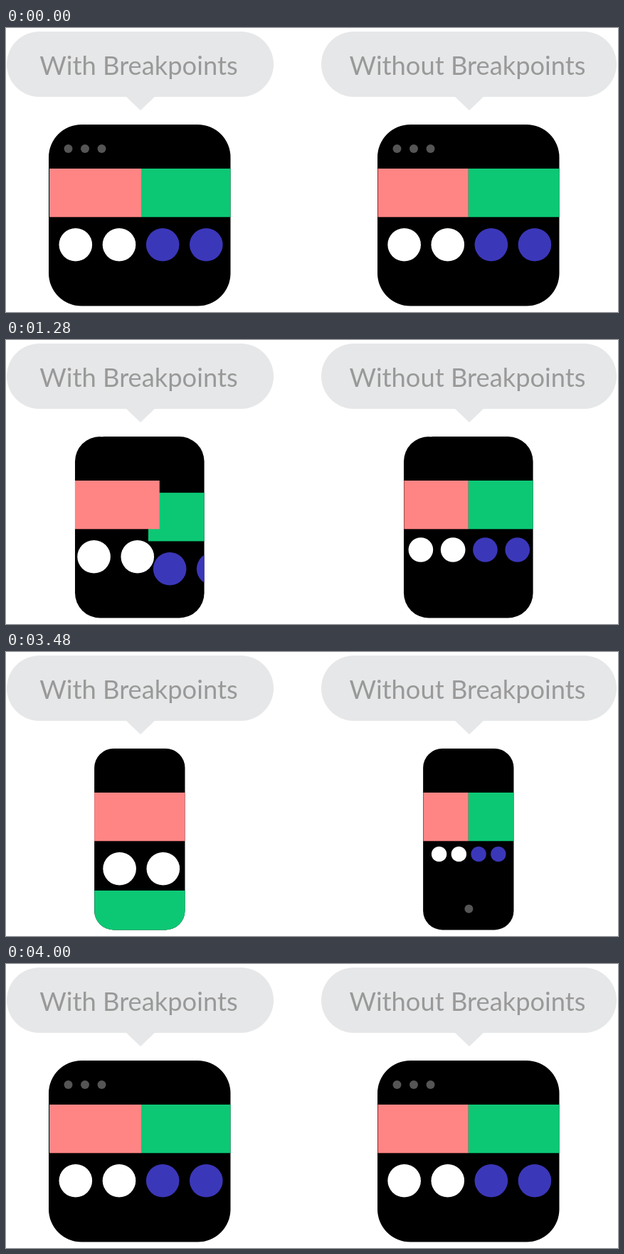
An HTML page that plays this animation: 860x400 px, repeating every 5.04 s.

```html
<!DOCTYPE html>
<html lang="en">
<head>
<meta charset="utf-8">
<title>Breakpoints</title>
<style>
  html, body { margin: 0; width: 100%; height: 100%; overflow: hidden; background: #fff; }
  svg { display: block; width: 860px; height: 400px; }
  text { font: 36.3px Lato, "Open Sans", sans-serif; fill: #999; text-anchor: middle; }
  .bubble { fill: #e6e7e8; }
  .pink { fill: #ff8585; }
  .green { fill: #0cc874; }
  .white { fill: #fff; }
  .blue { fill: #3b37b9; }
  .grey { fill: #555; }
</style>
</head>
<body>
<svg id="stage" viewBox="0 0 860 400"></svg>
<script>
const LOOP = 5040, STEP = 40;
const stage = document.getElementById('stage');

function add(parent, tag, attrs) {
  const el = document.createElementNS('http://www.w3.org/2000/svg', tag);
  parent.appendChild(el);
  return set(el, attrs || {});
}
function set(el, attrs) {
  for (const key in attrs) el.setAttribute(key, attrs[key]);
  return el;
}
const circle = (parent, cls, cx, cy, r) => add(parent, 'circle', { class: cls, cx, cy, r });
const band = (parent, cls, x, width) => add(parent, 'rect', { class: cls, x, y: 198, width, height: 68.3 });
const move = (el, x, y) => set(el, { transform: `translate(${x} ${y})` });
const mix = (a, b, p) => a + (b - a) * p;

// Sine ease in and out; skew shifts the fast part earlier (<1) or later (>1)
function ease(t, start, end, skew = 1) {
  const u = Math.min(1, Math.max(0, (t - start) / (end - start)));
  return (1 - Math.cos(Math.PI * u ** skew)) / 2;
}

function bubble(x, width, tip, label) {
  add(stage, 'rect', { class: 'bubble', x, y: 5, width, height: 92, rx: 46 });
  add(stage, 'path', { class: 'bubble', d: `M${tip - 21} 96h42l-21 20z` });
  add(stage, 'text', { x: x + width / 2 - 2, y: 66 }).textContent = label;
}

const defs = add(stage, 'defs');

function device(id, left) {
  const clip = add(add(defs, 'clipPath', { id }), 'rect', { y: 136, height: 255.4 });
  const body = add(stage, 'g', { 'clip-path': `url(#${id})` });
  add(body, 'rect', { x: left, y: 136, width: 256, height: 256 });
  const dots = add(body, 'g');
  for (let i = 0; i < 3; i++) circle(dots, 'grey', left + 27.5 + 23.5 * i, 170, 6);
  const home = circle(body, 'grey', left + 128.4, 361.5, 6);

  return {
    body,
    resize(p) {
      set(clip, { x: left + 64.3 * p, width: mix(255.5, 127, p), rx: mix(46, 27, p) });
      move(dots, 0, -68 * p);
      move(home, 0, 90 * (1 - p));
    }
  };
}

bubble(1, 375, 189, 'With Breakpoints');
bubble(443, 415, 651, 'Without Breakpoints');

// Left: blocks keep their size and wrap
const wrapped = device('wrapped', 60);
const row = add(wrapped.body, 'g');
const second = add(row, 'g');
band(second, 'green', 190, 130);
circle(second, 'blue', 220.2, 305.2, 23.3);
circle(second, 'blue', 281.3, 305.2, 23.3);
band(row, 'pink', 61, 129);
circle(row, 'white', 97.8, 305.2, 23.3);
circle(row, 'white', 159, 305.2, 23.3);

// Right: blocks shrink with the screen
const shrunk = device('shrunk', 522);
const pink = band(shrunk.body, 'pink', 522.6, 127.2);
band(shrunk.body, 'green', 649.8, 130);
const balls = ['white', 'white', 'blue', 'blue'].map(cls => circle(shrunk.body, cls, 0, 0, 0));

function draw(t) {
  const closing = t < 2500;
  const screen = closing ? ease(t, 1020, 1530, 0.893) : 1 - ease(t, 3450, 4002, 1.16);
  const slide = closing ? ease(t, 1020, 1560, 1.105) : 1 - ease(t, 3450, 4002, 1.15);
  const wrap = closing ? ease(t, 1197, 1560) : 1 - ease(t, 3467, 3830);
  const shrink = closing ? ease(t, 1020, 1560) : 1 - ease(t, 3450, 4002);

  wrapped.resize(screen);
  shrunk.resize(screen);
  move(row, 62 * slide, 0);
  move(second, -128 * wrap, 138.4 * wrap);

  const edge = 522.6 + 64 * screen;
  set(pink, { x: edge, width: 649.8 - edge });
  const mid = mix(651.3, 650.2, shrink), gap = mix(61.1, 27.5, shrink);
  balls.forEach((ball, i) => set(ball, {
    cx: mid + gap * (i - 1.5),
    cy: mix(305.2, 284.5, shrink),
    r: mix(23.3, 10.6, shrink)
  }));
}

const began = performance.now();
function tick() {
  const t = (performance.now() - began) % LOOP;
  draw(Math.floor(t / STEP) * STEP);
  requestAnimationFrame(tick);
}
tick();
</script>
</body>
</html>
```
